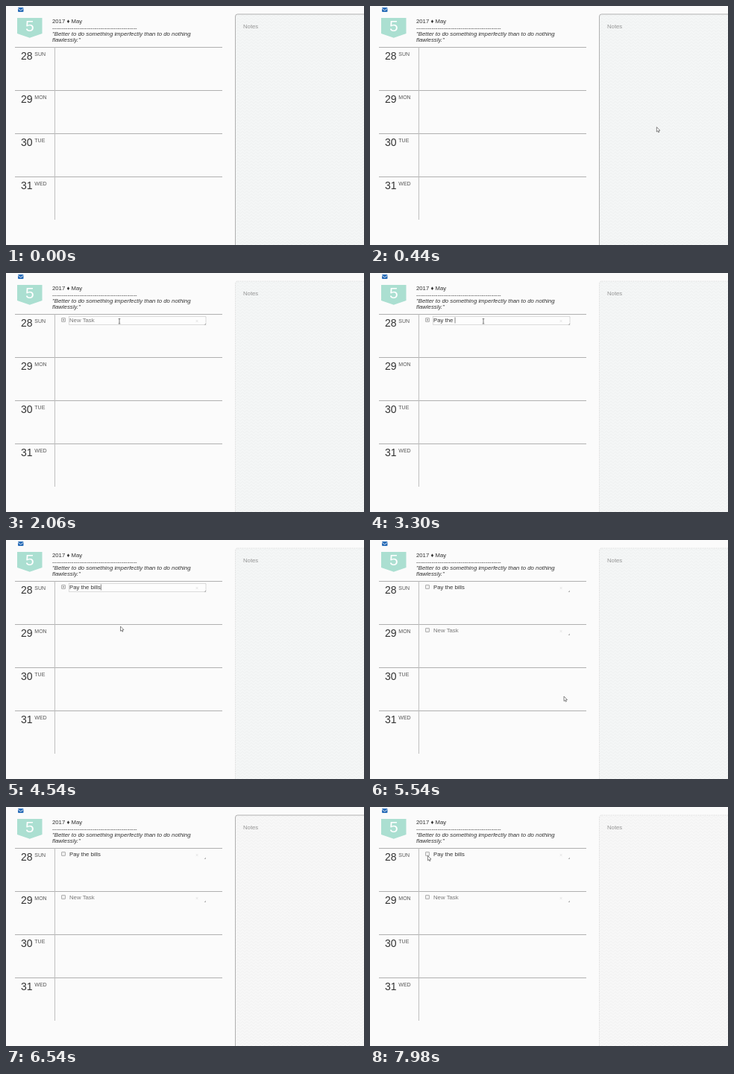
Animation of 480x321 px, one loop 8 s. Source, as an HTML page with a canvas:

```html
<!DOCTYPE html>
<html lang="en">
<head>
<meta charset="utf-8">
<title>Weekly planner</title>
<style>
  html, body { margin: 0; width: 100%; height: 100%; overflow: hidden; background: #fbfbfb; }
  canvas { display: block; width: 480px; height: 321px; }
</style>
</head>
<body>
<canvas id="stage"></canvas>
<script>
const LOOP = 8000;
const FIRST_DAY = 28;
const TOP = 55.5;
const ROW = 58;
const INK = '#333';

// Moments in ms
const ADD_FIRST = 980, FOCUS = 2060, TYPE = 2750, LETTER = 77;
const LEAVE_FIELD = 4240, ADD_SECOND = 4920, REPAINT = 6540;

const AWAY = { x: 490, y: 200 };
const MOVES = [
  { from: 210, to: 830, x: 152.5, y: 80.5 },
  { from: 1300, to: 1750, x: 153, y: 122 },
  { from: 1830, to: FOCUS, x: 152, y: 61.5 },
  { from: 4230, to: 4540, x: 153.5, y: 116 },
  { from: 5180, to: 5540, x: 260, y: 210 },
  { from: 5540, to: 5930, ...AWAY },
  { from: 6830, to: 7830, x: 77.5, y: 65.5 }
];

const canvas = document.getElementById('stage');
const ctx = canvas.getContext('2d');
const scale = window.devicePixelRatio || 1;
canvas.width = 480 * scale;
canvas.height = 321 * scale;

const ramp = (t, from, to) => Math.max(0, Math.min(1, (t - from) / (to - from)));
const smooth = p => p * p * (3 - 2 * p);

function text(str, x, y, color = INK, size = 7.75, style = '') {
  ctx.font = `${style} ${size}px "Liberation Sans", Arial, sans-serif`;
  ctx.fillStyle = color;
  ctx.fillText(str, x, y);
}

function shape(points, fill) {
  ctx.beginPath();
  points.forEach(([x, y]) => ctx.lineTo(x, y));
  ctx.closePath();
  ctx.fillStyle = fill;
  ctx.fill();
}

function line(points, color, width = 1) {
  ctx.beginPath();
  points.forEach(([x, y]) => ctx.lineTo(x, y));
  ctx.strokeStyle = color;
  ctx.lineWidth = width;
  ctx.stroke();
}

function box(x, y, w, h, radius, fill, stroke, dash = []) {
  ctx.beginPath();
  ctx.roundRect(x, y, w, h, radius);
  ctx.fillStyle = fill;
  ctx.fill();
  if (!stroke) return;
  ctx.setLineDash(dash);
  ctx.strokeStyle = stroke;
  ctx.lineWidth = 1;
  ctx.stroke();
  ctx.setLineDash([]);
}

// Faint zigzag paper for the notes panel
function makeWeave() {
  const tile = document.createElement('canvas');
  tile.width = 6;
  tile.height = 4;
  const c = tile.getContext('2d');
  c.strokeStyle = 'rgba(0,0,0,.018)';
  for (let y = -4; y <= 4; y += 4) {
    for (let x = -4; x <= 8; x += 3) c.lineTo(x, y + (x % 2 ? 0 : 3));
    c.stroke();
    c.beginPath();
  }
  return ctx.createPattern(tile, 'repeat');
}
const weave = makeWeave();

function drawHeader() {
  box(16, 2, 7.5, 6, 1, '#2a6db8');
  line([[16, 3.2], [19.7, 6], [23.5, 3.2]], '#fbfbfb', 0.8);
  shape([[15, 16], [48.5, 16], [48.5, 37], [31.8, 42.7], [15, 37]], '#abdfd1');
  text('5', 26, 34.3, '#fff', 21);
  text('2017 ♦ May', 62, 23);
  text('-'.repeat(44), 62, 32);
  text('"Better to do something imperfectly than to do nothing', 62, 40, INK, 7.8, 'italic');
  text('flawlessly."', 62, 48, INK, 7.8, 'italic');
}

function drawDays() {
  ['SUN', 'MON', 'TUE', 'WED'].forEach((name, i) => {
    const y = TOP + i * ROW;
    line([[12, y], [290, y]], '#b0b0b0');
    text(FIRST_DAY + i, 20, y + 16.5, INK, 14);
    text(name, 38.3, y + 11.5, '#555', 7);
  });
  line([[65.5, TOP], [65.5, 287]], '#c0c0c0');
}

function drawNotes(hover, fill) {
  const edge = 226 - 50 * hover;
  box(307.5, 11, 190, 330, 3, fill);
  box(307.5, 11, 190, 330, 3, weave, `rgb(${edge},${edge},${edge})`, hover ? [] : [2, 1]);
  text('Notes', 318, 29.7, '#949494');
}

function drawTask(row, label, color, focused) {
  const y = TOP + row * ROW;
  box(74.5, y + 5, 5, 5, 0.5, '#eee', '#b0b0b0');
  if (focused) {
    box(76, y + 6.5, 2, 2, 0, '#aaa');
    box(84.5, y + 3, 183.5, 11, 0, '#fdfdfd', '#b8b8b8', [1, 1]);
  }
  text(label, 85, y + 10.3, color);
  if (focused && color === INK) {
    const caret = 85.6 + ctx.measureText(label).width;
    line([[caret, y + 4], [caret, y + 12]], '#555', 0.7);
  }
  text('×', 254, y + 11.5, '#ddd', 7);
  shape([[268, y + 12], [268, y + 14.5], [265.5, y + 14.5]], '#b5b5b5');
}

function pointerAt(t) {
  let { x, y } = AWAY;
  for (const move of MOVES) {
    const p = smooth(ramp(t, move.from, move.to));
    x += (move.x - x) * p;
    y += (move.y - y) * p;
  }
  return [x, y];
}

function drawPointer(t) {
  ctx.save();
  ctx.translate(...pointerAt(t));
  const overField = (t > FOCUS && t < LEAVE_FIELD) || (t > ADD_SECOND && t < 5230);
  if (overField) {
    line([[0, 0], [0, 6.5]], '#555', 0.8);
    for (const y of [0, 6.5]) line([[-1.3, y], [1.3, y]], '#555', 0.7);
  } else {
    shape([[0, 0], [0, 6.4], [1.5, 5.1], [2.4, 7.2], [3.4, 6.8], [2.6, 4.7], [4.5, 4.6]], '#fff');
    ctx.strokeStyle = '#555';
    ctx.lineWidth = 0.7;
    ctx.stroke();
  }
  ctx.restore();
}

function draw(t) {
  ctx.setTransform(scale, 0, 0, scale, 0, 0);
  ctx.fillStyle = '#fbfbfb';
  ctx.fillRect(0, 0, 480, 321);

  const hover = 1 - ramp(t, 430, 830) + ramp(t, 5680, 6080) - ramp(t, 7130, 7530);
  drawHeader();
  drawDays();
  drawNotes(hover, t < REPAINT ? '#f4f6f6' : '#f7f7f7');

  if (t >= ADD_FIRST) {
    const typing = t >= TYPE;
    const letters = 1 + Math.floor((t - TYPE) / LETTER);
    const label = typing ? 'Pay the bills'.slice(0, letters) : 'New Task';
    drawTask(0, label, typing ? INK : '#777', t >= FOCUS && t < ADD_SECOND);
  }
  if (t >= ADD_SECOND) drawTask(1, 'New Task', '#777', false);
  drawPointer(t);
}

function frame() {
  draw(performance.now() % LOOP);
  requestAnimationFrame(frame);
}
frame();
</script>
</body>
</html>
```
